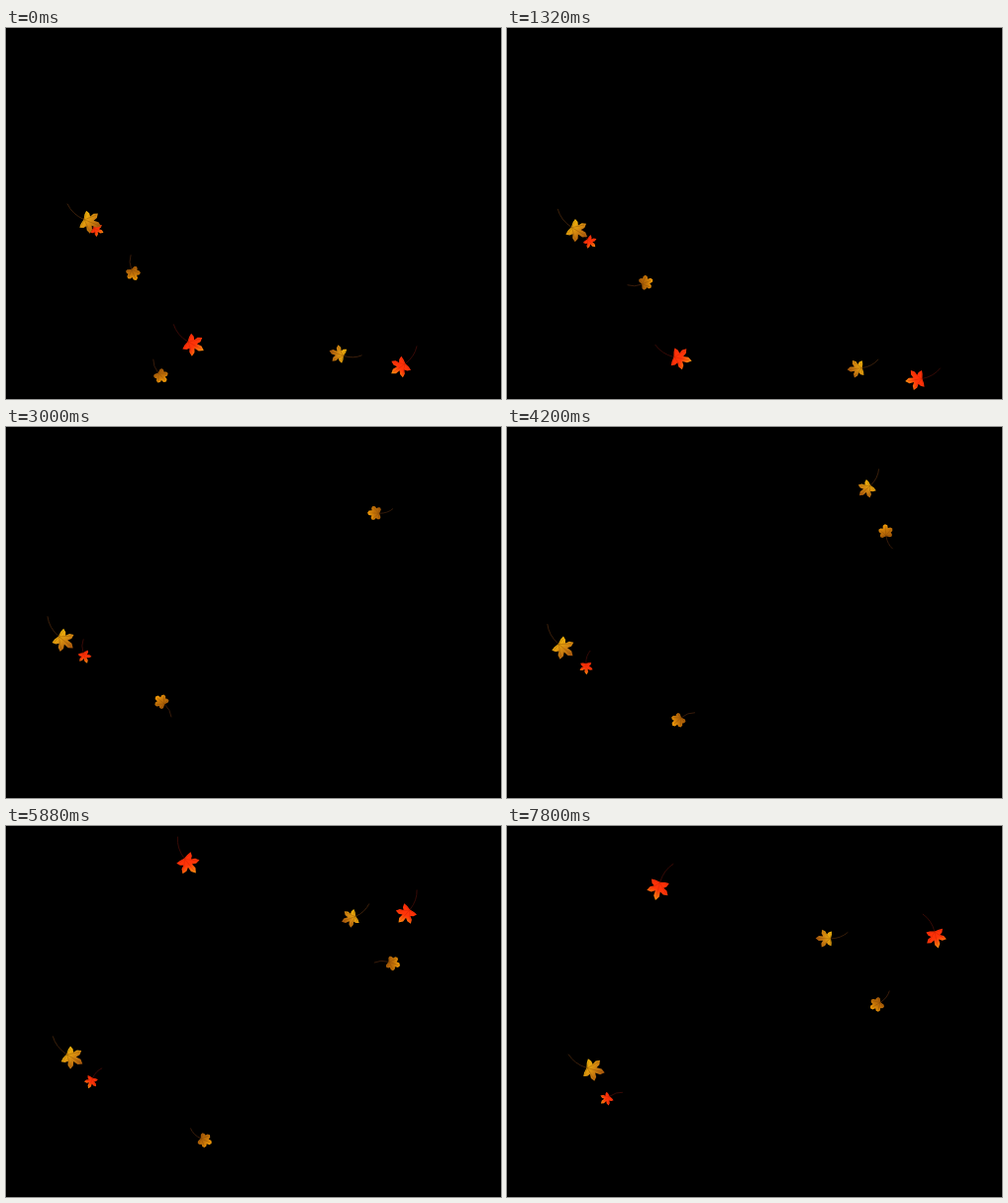
An HTML page with a canvas that plays this animation: 500x375 px, repeating every 8 s.

```html
<!DOCTYPE html>
<html lang="en">
<head>
<meta charset="utf-8">
<title>Falling leaves</title>
<style>
  html, body { margin: 0; width: 100%; height: 100%; overflow: hidden; background: #000; }
  canvas { display: block; }
</style>
</head>
<body>
<canvas id="stage" width="500" height="375"></canvas>
<script>
const ctx = document.getElementById('stage').getContext('2d');
const { sin, cos, abs, PI } = Math;
const LOOP = 8, FIRST = .36, STEP = .24;   // seconds
const STEM_BEND = 18 * PI / 180;

// Colours run from the stem to the tip; notch and tooth are distances from the middle.
const KINDS = {
  gold: { notch: .4, tooth: .74, stops: ['#f4b60c', '#d08410', '#a8580c'], stem: '#44240c', vein: '#783c04' },
  amber: { notch: .6, tooth: .88, stops: ['#a85c08', '#c07008', '#f49c08'], stem: '#40200c', vein: '#7c4404' },
  red: { notch: .38, tooth: .72, stops: ['#ff3008', '#ff3408', '#ff8c10'], stem: '#400c08', vein: '#b82004' }
};

// Each path gives [x, y, stem angle in degrees] at t seconds; curl is the side the stem bends to.
const leaves = [
  { kind: 'red', radius: 7.8, curl: 1,
    path: t => [79 + 1.1 * (t - 3.3) ** 2, 203.5 + 9.2 * t, 222 + 15 * t] },
  { kind: 'gold', radius: 13, curl: 1,
    path: t => {
      const sway = cos(.47 * (t - 3.8));
      return [78.5 - 23 * sway, 195.5 + 6.45 * t, 223.5 + 17 * sway - .7 * t];
    } },
  { kind: 'amber', radius: 8.3, curl: 1, to: 7.8,
    path: t => [128 + 7.5 * t + .8 * t * t, 247 + 11.2 * t - 4.5 * sin(.85 * t), 264 - 68.5 * t] },
  { kind: 'amber', radius: 8.3, curl: 1, to: .36,
    path: () => [156, 351, 246] },
  { kind: 'red', radius: 12.8, curl: 1, to: 2.76,
    path: t => [188 - 11 * t, 319.5 + 10.7 * t, 227 - 13 * t] },
  { kind: 'red', radius: 12, curl: -1, to: 3,
    path: t => [399.5 + 11.5 * t, 342 + 10 * t, 307 + 20 * t] },
  { kind: 'gold', radius: 10.5, curl: -1, to: 2.76,
    path: t => [337 + 9 * t + 3.3 * t * t, 330 + 10.7 * t, 2 - 20 * t] },
  { kind: 'amber', radius: 8.3, curl: -1, from: 1.56,
    path: t => [382 + 8.5 * cos(1.15 * (t - 5.5)), 47.8 + 10.7 * t + .8 * t * t, 141 + 68 * t] },
  { kind: 'gold', radius: 10.5, curl: -1, from: 3.24,
    path: t => [366.6 + 5.3 * t - 1.4 * t * t, -67.4 + 39.6 * t - 2.1 * t * t, 250 + 12 * t] },
  { kind: 'red', radius: 13, curl: 1, from: 5.4,
    path: t => [275 - 15.6 * t, -39.6 + 13 * t, 87 + 27.6 * t] },
  { kind: 'red', radius: 12, curl: -1, from: 5.4,
    path: t => [319 + 14.6 * t, 17.6 + 12 * t, 458 - 28 * t] }
];

const polar = (r, angle) => [r * cos(angle), r * sin(angle)];

// Five toothed lobes fan out around the tip at -x; the stem leaves along +x.
const LOBES = [-2, -1, 0, 1, 2].map(k => ({
  angle: PI + k * 1.08,
  length: 1.05 - .1 * abs(k)
}));

function traceBlade({ notch, tooth }) {
  ctx.beginPath();
  ctx.moveTo(.4, 0);
  LOBES.forEach(({ angle, length }, i) => {
    if (i) ctx.lineTo(...polar(notch, angle - .54));
    ctx.lineTo(...polar(tooth * length, angle - .3));
    ctx.lineTo(...polar(length, angle));
    ctx.lineTo(...polar(tooth * length, angle + .3));
  });
  ctx.closePath();
}

function drawLeaf({ kind, radius, curl, path }, t) {
  const style = KINDS[kind];
  const [x, y, degrees] = path(t);
  ctx.save();
  ctx.translate(x, y);
  ctx.rotate(degrees * PI / 180 - STEM_BEND * curl);
  ctx.scale(radius, radius * curl);

  ctx.beginPath();
  ctx.moveTo(.4, 0);
  ctx.quadraticCurveTo(1.4, .05, ...polar(2.15, STEM_BEND));
  ctx.strokeStyle = style.stem;
  ctx.lineWidth = .8 / radius;
  ctx.stroke();

  const fill = ctx.createLinearGradient(.5, .2, -.9, -.2);
  style.stops.forEach((color, i) => fill.addColorStop(i / 2, color));
  traceBlade(style);
  ctx.fillStyle = fill;
  ctx.fill();

  ctx.beginPath();
  for (const { angle, length } of LOBES) {
    ctx.moveTo(.35, 0);
    ctx.lineTo(...polar(.8 * length, angle));
  }
  ctx.globalAlpha = .5;
  ctx.strokeStyle = style.vein;
  ctx.lineWidth = .6 / radius;
  ctx.stroke();
  ctx.restore();
}

function render(seconds) {
  const time = seconds % LOOP;
  const step = Math.floor((time - FIRST) / STEP + 1e-6);
  const t = step < 0 ? 0 : FIRST + step * STEP;
  ctx.fillStyle = '#000';
  ctx.fillRect(0, 0, 500, 375);
  for (const leaf of leaves) {
    const { from = 0, to = LOOP } = leaf;
    if (t > from - STEP / 2 && t < to - STEP / 2) drawLeaf(leaf, t);
  }
}

const start = performance.now();
function tick() {
  render((performance.now() - start) / 1000);
  requestAnimationFrame(tick);
}
tick();
</script>
</body>
</html>
```
